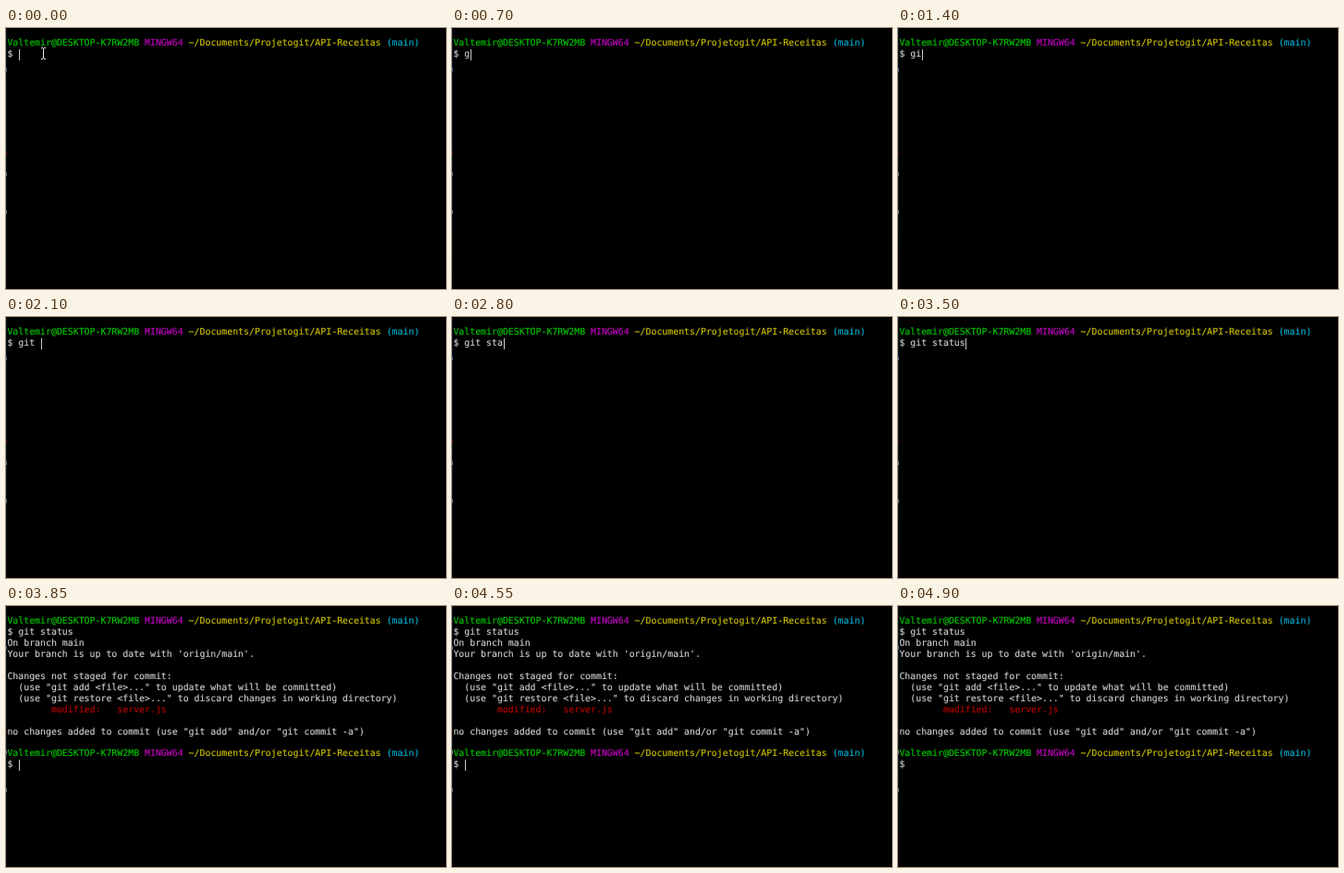
These frames come from a looping animation (476 by 282 pixels, 5250 ms). An HTML page:

```html
<!DOCTYPE html>
<html lang="en">
<head>
<meta charset="utf-8">
<title>Terminal: git status</title>
<style>
  @property --typed { syntax: "<integer>"; inherits: true; initial-value: 0; }

  html, body { margin: 0; width: 100%; height: 100%; overflow: hidden; background: #000; }

  .term {
    --char: .602em;
    --row: 11.92px;
    position: absolute; inset: 0;
    font: 9.88px/var(--row) "DejaVu Sans Mono", "Liberation Mono", monospace;
    text-rendering: geometricPrecision;
    -webkit-text-stroke: .15px;
    color: #cfcfcf;
    animation: type 5250ms step-end infinite;
  }
  pre { position: absolute; left: 1.4px; margin: 0; font: inherit; }
  .input { top: 11.3px; }
  .output { top: calc(11.3px + 2 * var(--row)); animation: output 5250ms step-end infinite; }

  .user { color: #00c800; }
  .sys { color: #c000c0; }
  .path { color: #ccc000; }
  .branch { color: #00b4d8; }
  .file { color: #b80000; }

  .cmd {
    display: inline-block;
    clip-path: inset(0 calc((10 - var(--typed)) * var(--char)) 0 0);
  }
  .caret { position: absolute; width: 1px; height: 12px; background: #c8c8c8; }
  .input .caret {
    left: calc((2 + var(--typed)) * var(--char) + .6px);
    top: calc(var(--row) - .4px);
    animation: caret-in 5250ms step-end infinite;
  }
  .output .caret {
    left: calc(2 * var(--char) + .6px);
    top: calc(11 * var(--row) - .4px);
    animation: caret-out 5250ms step-end infinite;
  }
  .beam { position: absolute; left: 37px; top: 20px; animation: beam 5250ms step-end infinite; }

  /* sliver of desktop along the left edge */
  .edge {
    position: absolute; left: 0; top: 0; width: 1px; height: 100%;
    background: linear-gradient(#071526, #0a1a2c 60%, #060c14);
  }
  .edge i { position: absolute; left: 0; width: 1px; height: 4px; background: #6f7a86; }

  /* one step is 350 ms, a fifteenth of the loop */
  @keyframes type {
    0% { --typed: 0; }
    13.33% { --typed: 1; }
    26.66% { --typed: 2; }
    33.33% { --typed: 3; }
    40% { --typed: 4; }
    46.66% { --typed: 5; }
    53.33% { --typed: 7; }
    60% { --typed: 8; }
    66.66%, 100% { --typed: 10; }
  }
  @keyframes caret-in {
    0%, 13.33% { opacity: 1; }
    6.66%, 73.33%, 100% { opacity: 0; }
  }
  @keyframes caret-out {
    0%, 86.66% { opacity: 1; }
    80%, 93.33%, 100% { opacity: 0; }
  }
  @keyframes output {
    0% { visibility: hidden; }
    73.33%, 100% { visibility: visible; }
  }
  @keyframes beam {
    0% { opacity: 1; }
    13.33%, 100% { opacity: 0; }
  }
</style>
</head>
<body>
<div class="term">
  <div class="edge"><i style="top:43px;background:#3f6f96"></i><i style="top:133px;background:#4a1c18"></i><i style="top:156px"></i><i style="top:197px"></i></div>
<pre class="input"><span class="user">Valtemir@DESKTOP-K7RW2MB</span> <span class="sys">MINGW64</span> <span class="path">~/Documents/Projetogit/API-Receitas</span> <span class="branch">(main)</span>
$ <span class="cmd">git status</span><span class="caret"></span></pre>
<pre class="output">On branch main
Your branch is up to date with 'origin/main'.

Changes not staged for commit:
  (use "git add &lt;file&gt;..." to update what will be committed)
  (use "git restore &lt;file&gt;..." to discard changes in working directory)
<span class="file">        modified:   server.js</span>

no changes added to commit (use "git add" and/or "git commit -a")

<span class="user">Valtemir@DESKTOP-K7RW2MB</span> <span class="sys">MINGW64</span> <span class="path">~/Documents/Projetogit/API-Receitas</span> <span class="branch">(main)</span>
$<span class="caret"></span></pre>
  <svg class="beam" width="7" height="15" fill="none" stroke="#e8e8e8">
    <path d="M1 1.5H3M4 1.5H6M3.5 2V13M1 13.5H3M4 13.5H6"/>
  </svg>
</div>
</body>
</html>
```
